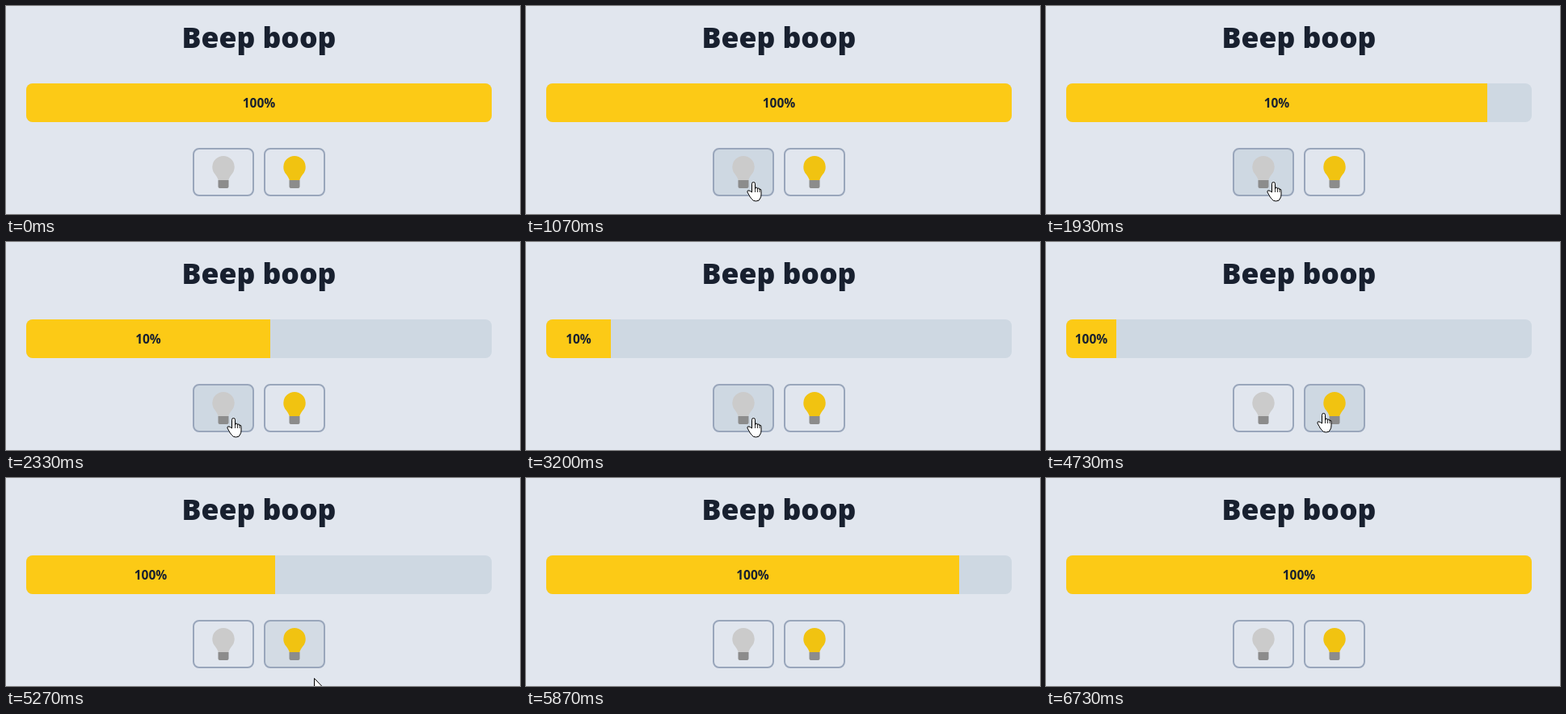
Write an HTML page that moves like this. It is 636 by 258 pixels and loops after 7.47 s.

```html
<!DOCTYPE html>
<html lang="en">
<head>
<meta charset="utf-8">
<title>Beep boop</title>
<style>
  html, body { margin: 0; height: 100%; overflow: hidden; background: #e1e6ee; }
  svg { display: block; }
  text { font-family: "Open Sans", "Noto Sans", sans-serif; fill: #18202f; text-anchor: middle; }
  .title { font-size: 35.5px; font-weight: 800; }
  .label { font-size: 15.5px; font-weight: 700; }
  .edge { fill: none; stroke: #99a6bb; stroke-width: 2; }
  .cursor { fill: #fff; stroke: #000; stroke-linejoin: round; }
</style>
</head>
<body>
<svg width="636" height="258" viewBox="0 0 636 258">
  <defs>
    <clipPath id="round"><rect x="25" y="96" width="576" height="48" rx="8"/></clipPath>
    <path id="glass" d="M-6.3 40C-7 37.500-9 34.300-10.300 32.800a13.700 13.700 0 1 1 20.600 0C9 34.300 7 37.500 6.300 40z"/>
    <path id="socket" fill="#8c8c8c" d="M-6.500 40h13v8q0 2-2 2h-9q-2 0-2-2z"/>
    <rect id="frame" x="-37" y="1" width="74" height="58" rx="7"/>
  </defs>

  <text class="title" x="313" y="52">Beep boop</text>

  <g clip-path="url(#round)">
    <rect x="25" y="96" width="576" height="48" fill="#ced8e2"/>
    <rect id="fill" x="25" y="96" width="576" height="48" fill="#fcca16"/>
  </g>
  <text id="label" class="label" y="126">100%</text>

  <g transform="translate(269 176)">
    <use id="hoverOff" href="#frame" fill="#ced8e2"/>
    <use href="#frame" class="edge"/>
    <use href="#glass" fill="#cbcbcb"/>
    <use href="#socket"/>
  </g>
  <g transform="translate(357 176)">
    <use id="hoverOn" href="#frame" fill="#ced8e2"/>
    <use href="#frame" class="edge"/>
    <use href="#glass" fill="#f1c311"/>
    <use href="#socket"/>
  </g>

  <g id="cursor" class="cursor">
    <path id="arrow" d="M.5.5V17L4.300 13.400 6.900 19.300 9.200 18.300 6.700 12.500H12z"/>
    <g id="hand">
      <path d="M-1.500 13V2.500a2 2 0 0 1 4 0V9Q2.500 7 4 7T5.500 9Q5.500 8 6.800 8T8.100 10Q8.100 9 9 9T10 11.500V16Q10 19 8.500 21 8 24 3.500 24-.5 24-1.500 21.500-4 19-5 16.500L-7 13Q-7.500 11-6 10.800-4 10.800-1.500 13z"/>
      <path d="M2.500 9v4M5.500 9v4M8.100 10v3" fill="none" stroke-width=".8"/>
    </g>
  </g>
</svg>
<script>
const LOOP = 7470, FPS = 15;
const DRAIN = 1718, REFILL = 4697, DURATION = 2000;
const FULL = 576, LOW = FULL * 0.1;
const ENTER = 660, CROSS = 3933, LEAVE = 5133, GONE = 5333;

const $ = id => document.getElementById(id);
const ramp = (t, start, length) => Math.min(1, Math.max(0, (t - start) / length));
const easeOut = u => 1 - (1 - u) ** 4;
const easeInOut = u => u * u * (3 - 2 * u);
const easeIn = u => u ** 1.4;

// cubic-bezier(.25, .1, .25, 1)
function ease(x) {
  let lo = 0, hi = 1, s;
  for (let i = 0; i < 24; i++) {
    s = (lo + hi) / 2;
    if (0.75 * s * (1 - s) + s ** 3 < x) lo = s; else hi = s;
  }
  return 0.3 * s * (1 - s) ** 2 + 3 * s * s * (1 - s) + s ** 3;
}

const progress = (t, start) => ease(ramp(t, start, DURATION));
const hover = (t, enter, leave) => ramp(t, enter, 150) - ramp(t, leave, 150);

// The pointer glides in from below, across to the second button, and out.
function pointer(t) {
  const enter = easeOut(ramp(t, ENTER, 400));
  const cross = easeInOut(ramp(t, CROSS, 400));
  const leave = easeIn(ramp(t, LEAVE, GONE - LEAVE));
  return [
    Math.round(297 - 16 * enter + 62 * cross + 67 * leave),
    Math.ceil(252 - 34 * enter - 6 * cross + 63 * leave)
  ];
}

function drawBar(t) {
  const width = Math.round(FULL + (LOW - FULL) * (progress(t, DRAIN) - progress(t, REFILL)));
  $("fill").setAttribute("width", width);
  $("label").setAttribute("x", 25 + width / 2);
  $("label").textContent = t >= DRAIN && t < REFILL ? "10%" : "100%";
}

function drawPointer(t) {
  const [x, y] = pointer(t);
  const overButton = y < 236 && (x < 307 || x >= 319);
  $("cursor").style.display = t >= ENTER && t < GONE ? "" : "none";
  $("cursor").setAttribute("transform", `translate(${x} ${y})`);
  $("hand").style.display = overButton ? "" : "none";
  $("arrow").style.display = overButton ? "none" : "";
}

function draw(time) {
  // The picture advances in steps of 1/15 s.
  const t = Math.floor((time % LOOP + 5) * FPS / 1000) * 1000 / FPS;
  drawBar(t);
  $("hoverOff").setAttribute("opacity", hover(t, 720, 4090));
  $("hoverOn").setAttribute("opacity", hover(t, 4150, 5227));
  drawPointer(t);
}

const begin = performance.now();
function tick() {
  draw(performance.now() - begin);
  requestAnimationFrame(tick);
}
tick();
</script>
</body>
</html>
```
